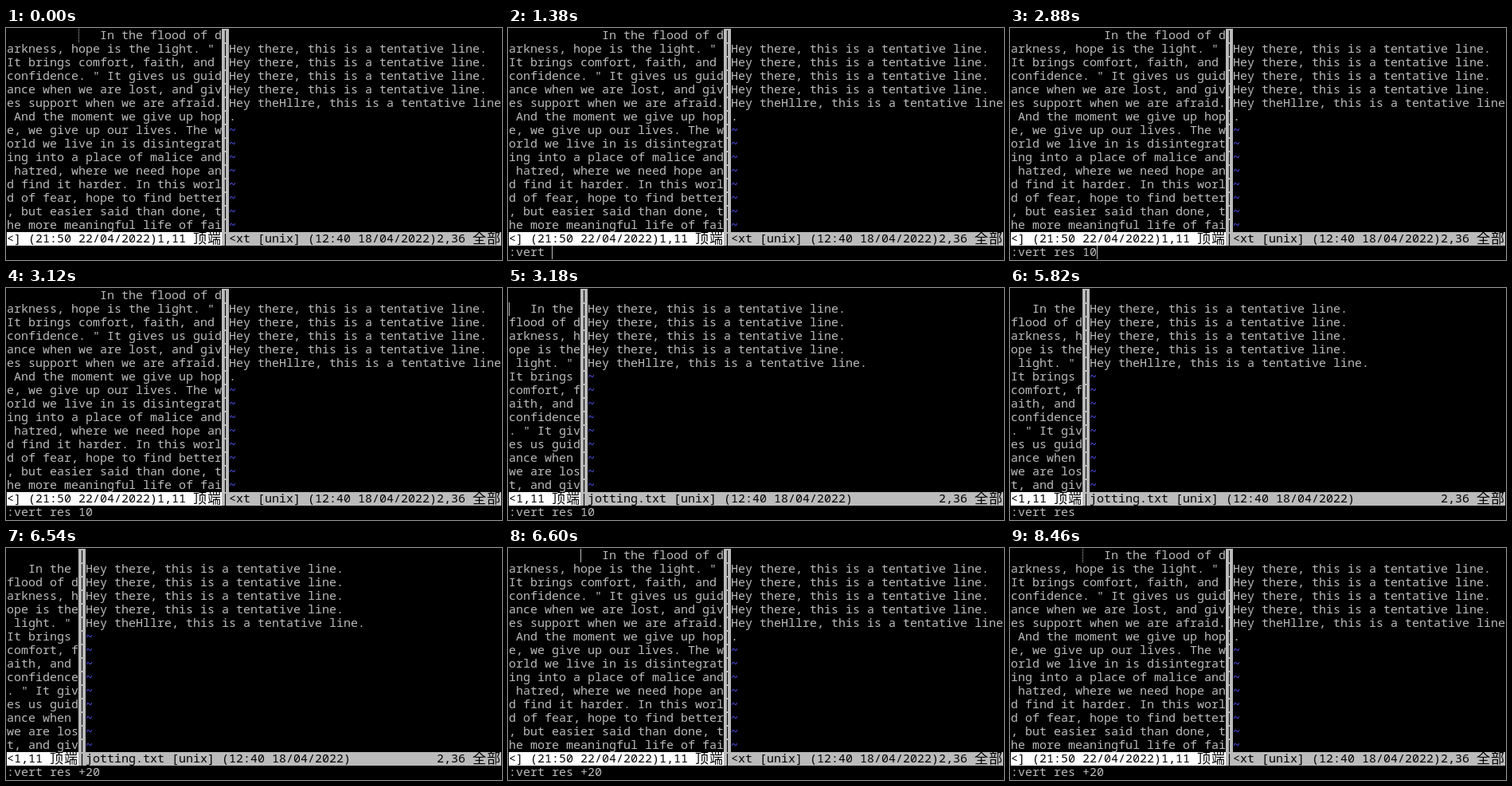
These frames come from a looping animation (623 px wide and 291 px high, 8.52 s). An HTML page with a canvas:

```html
<!DOCTYPE html>
<html lang="en">
<head>
<meta charset="utf-8">
<style>
html, body { margin: 0; width: 100%; height: 100%; overflow: hidden; background: #000; }
canvas { display: block; }
</style>
</head>
<body>
<canvas id="screen" width="623" height="291"></canvas>
<script>
const ctx = document.getElementById('screen').getContext('2d');
const CELL_W = 9, CELL_H = 17, COLS = 69, ROWS = 15, LOOP = 8520;
const GRAY = '#bbb', WHITE = '#fff', BLACK = '#000', BLUE = '#55f';

const essay = ' '.repeat(13) +
  'In the flood of darkness, hope is the light. " It brings comfort, faith, and ' +
  'confidence. " It gives us guidance when we are lost, and gives support when we ' +
  'are afraid. And the moment we give up hope, we give up our lives. The world we ' +
  'live in is disintegrating into a place of malice and hatred, where we need hope ' +
  'and find it harder. In this world of fear, hope to find better, but easier said ' +
  'than done, the more meaningful life of fai';
const notes = ['', ...Array(4).fill('Hey there, this is a tentative line.'),
  'Hey theHllre, this is a tentative line.'];

// [start ms, command line, cursor place, pending key]
const steps = [
  [0, '', 'dotted'], [180, '', 'editor'],
  [660, ':', 'command'], [960, ':ve', 'command'], [1140, ':ver', 'command'],
  [1320, ':vert', 'command'], [1380, ':vert ', 'command'], [1740, ':vert r', 'command'],
  [1920, ':vert re', 'command'], [2040, ':vert res', 'command'],
  [2340, ':vert res ', 'command'], [2820, ':vert res 1', 'command'],
  [2880, ':vert res 10', 'command'], [3120, ':vert res 10', ''],
  [3180, ':vert res 10', 'editor'], [3600, ':vert res 10', ''],
  [4140, ':vert res 10', 'editor'], [4260, ':vert res 10', 'editor', ':'],
  [4320, ':', 'command'], [4680, ':vert res 10', 'command'],
  [5160, ':vert res 1', 'command'], [5280, ':vert res ', 'command'],
  [5820, ':vert res ', ''], [6000, ':vert res +', 'command'],
  [6240, ':vert res +2', 'command'], [6360, ':vert res +20', 'command'],
  [6540, ':vert res +20', ''], [6600, ':vert res +20', 'editor'],
  [7080, ':vert res +20', ''], [7560, ':vert res +20', 'editor'],
  [8100, ':vert res +20', ''], [8460, ':vert res +20', 'dotted'],
];

const cellX = col => 1 + col * CELL_W;
const cellY = row => 1 + row * CELL_H;

function fill(col, row, cols, rows, color) {
  ctx.fillStyle = color;
  ctx.fillRect(cellX(col), cellY(row), cols * CELL_W, rows * CELL_H);
}

function print(text, col, row, color = GRAY) {
  ctx.fillStyle = color;
  for (const char of text) {
    const isWide = char > '\u2e80';
    ctx.font = isWide ? '17px "Noto Sans CJK SC", sans-serif' : '15px "Noto Sans Mono", monospace';
    ctx.fillText(char, cellX(col), cellY(row) + (isWide ? 14 : 13));
    col += isWide ? 2 : 1;
  }
}

const wrap = (line, width) => line.match(new RegExp(`.{1,${width}}`, 'g')) || [''];

function drawCursor(col, row, dotted) {
  ctx.fillStyle = GRAY;
  for (let y = 0; y < CELL_H; y += dotted ? 2 : 1) ctx.fillRect(cellX(col), cellY(row) + y, 1, 1);
}

function drawWindows(split) {
  const start = split + 1, width = COLS - start;
  wrap(essay, split).slice(0, ROWS).forEach((line, row) => print(line, 0, row));

  const lines = notes.flatMap(line => wrap(line, width));
  for (let row = 0; row < ROWS; row++) {
    if (row < lines.length) print(lines[row], start, row);
    else print('~', start, row, BLUE);
  }

  fill(split, 0, 1, ROWS + 1, GRAY);
  for (let row = 0; row <= ROWS; row++) print('|', split, row, BLACK);

  const wide = split === 30;
  fill(0, ROWS, split, 1, WHITE);
  fill(start, ROWS, width, 1, GRAY);
  print(wide ? '<] (21:50 22/04/2022)1,11 顶端' : '<1,11 顶端', 0, ROWS, BLACK);
  print((wide ? '<xt' : 'jotting.txt') + ' [unix] (12:40 18/04/2022)', start, ROWS, BLACK);
  print('2,36 全部', 60, ROWS, BLACK);
}

function draw() {
  const time = performance.now() % LOOP;
  const [, command, cursor, pending = ''] = steps.findLast(step => step[0] <= time);
  const wide = time < 3180 || time >= 6600;

  ctx.fillStyle = BLACK;
  ctx.fillRect(0, 0, 623, 291);
  drawWindows(wide ? 30 : 10);
  print(command, 0, ROWS + 1);
  print(pending, 58, ROWS + 1);

  if (cursor === 'command') drawCursor(command.length, ROWS + 1);
  else if (cursor) drawCursor(wide ? 10 : 0, wide ? 0 : 1, cursor === 'dotted');
  requestAnimationFrame(draw);
}
draw();
</script>
</body>
</html>
```
